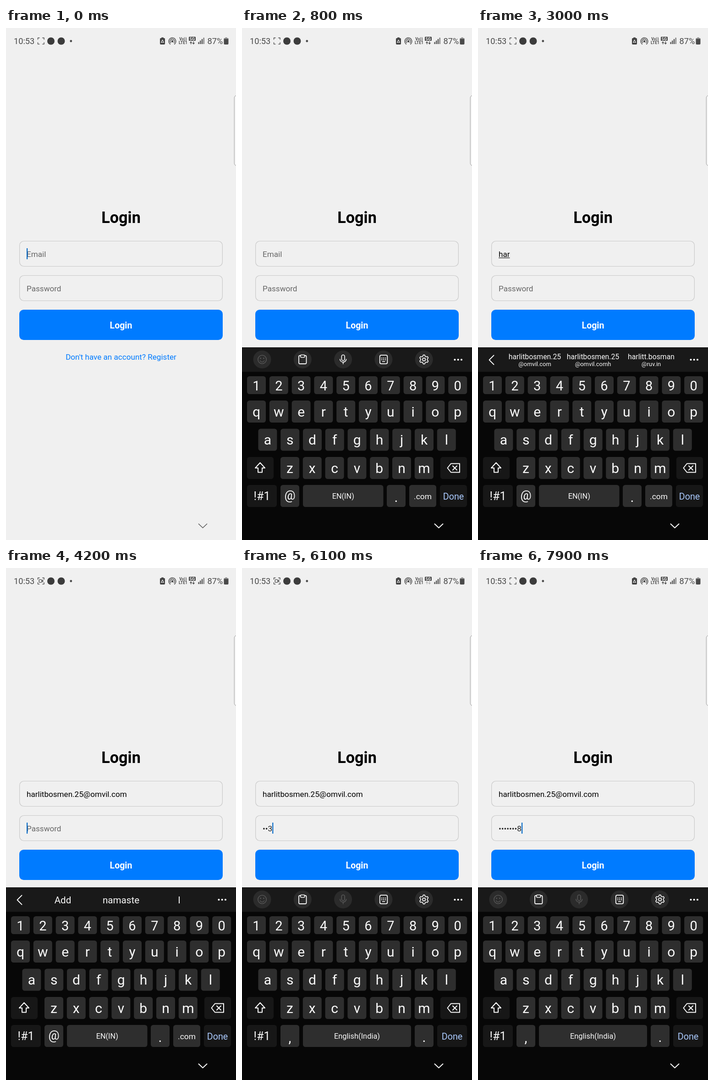
Animation, 502 px wide and 1116 px high, one loop 8000 ms. Source, as an HTML page with a canvas:

```html
<!DOCTYPE html>
<html lang="en">
<head>
<meta charset="utf-8">
<title>Login form typing</title>
<style>
html, body { margin: 0; width: 100%; height: 100%; overflow: hidden; background: #f0f0f0; }
canvas { display: block; width: 100vw; height: 100vh; }
</style>
</head>
<body>
<canvas id="stage" width="502" height="1116"></canvas>
<script>
const ctx = document.getElementById('stage').getContext('2d');
const LOOP = 8000, STEP = 100, PITCH = 48.8;
const BLUE = '#007bff', KEY = '#2e2e2e', FN = '#171717', INK = '#4a4a4a', WHITE = '#fafafa', DIM = '#565656';
const USER = 'harlitbosmen.25', HOST = '@omvil.com', EMAIL = USER + HOST;
const ROWS = [
  { keys: '1234567890', x: 11, y: 759, h: 39, base: 790, size: 29 },
  { keys: 'qwertyuiop', x: 11, y: 812, h: 48, base: 847, size: 30 },
  { keys: 'asdfghjkl', x: 35.4, y: 873.5, h: 48, base: 908, size: 30 },
  { keys: 'zxcvbnm', x: 84, y: 935, h: 48, base: 969.5, size: 30 }
];
// A key shows its bubble for one step, then its character is entered.
const PRESSES = [
  ['h', 1000], ['a', 1200], ['r', 1400],
  ['1', 5000], ['2', 5300], ['3', 5800], ['4', 6200],
  ['5', 6600], ['6', 7100], ['7', 7500], ['8', 7800]
];
const PICK = 3500, FOCUS = 4100, PASS_KEYS = 4300;

function text(s, x, y, size, color, align = 'left', weight = 400) {
  ctx.font = `${weight} ${size}px Roboto, sans-serif`;
  ctx.textAlign = align;
  ctx.fillStyle = color;
  ctx.fillText(s, x, y);
}

function box(x, y, w, h, r, fill, stroke, lw = 1.2) {
  ctx.beginPath();
  ctx.roundRect(x, y, w, h, r);
  if (fill) { ctx.fillStyle = fill; ctx.fill(); }
  if (stroke) { ctx.strokeStyle = stroke; ctx.lineWidth = lw; ctx.stroke(); }
}

function disc(x, y, r, fill) {
  ctx.beginPath();
  ctx.arc(x, y, r, 0, 7);
  ctx.fillStyle = fill;
  ctx.fill();
}

function arc(x, y, r, from, to, color, lw) {
  ctx.beginPath();
  ctx.arc(x, y, r, from, to);
  ctx.strokeStyle = color;
  ctx.lineWidth = lw;
  ctx.stroke();
}

function line(points, color, lw, close) {
  ctx.beginPath();
  points.forEach(([x, y]) => ctx.lineTo(x, y));
  if (close) ctx.closePath();
  ctx.strokeStyle = color;
  ctx.lineWidth = lw;
  ctx.lineJoin = ctx.lineCap = 'round';
  ctx.stroke();
}

function drawStatus(t) {
  text('10:53', 17, 35, 18.2, INK);
  for (const sx of [-1, 1]) for (const sy of [-1, 1]) {
    const at = (a, b) => [76.3 + sx * a, 28.3 + sy * b];
    line([at(6.8, 3.4), at(6.8, 6.8), at(3.4, 6.8)], INK, 1.3);
  }
  const blink = Math.floor((t - 198) / 491);
  if (blink >= 0 && blink % 2 === 0) {
    box(72.2, 25.3, 5.8, 6, 1.2, null, INK, 1.3);
    line([[78.2, 28], [80.6, 26], [80.6, 30.6], [78.2, 28.6]], INK, 1.1);
  }
  disc(98, 28.5, 8, '#3c3c3c');
  disc(120.5, 28.5, 8, '#3c3c3c');
  disc(141.8, 28.5, 2.4, INK);

  box(339, 20.5, 5, 3, 1, '#444');
  box(336, 22, 11, 14, 2, '#444');
  line([[341.5, 26], [344.3, 31.5], [338.7, 31.5]], '#eee', 1.2, true);

  disc(363, 29, 2.4, INK);
  arc(363, 29, 4.9, 2.4, 7.02, INK, 1.5);
  arc(363, 29, 7.8, 2.2, 7.22, INK, 1.5);

  text('Vo))', 386.5, 27, 8.6, INK, 'center', 700);
  text('LTE1', 386.5, 35, 8.6, INK, 'center', 700);
  box(399, 19, 15, 9, 1.5, '#444');
  text('5G', 406.5, 26.8, 9, '#f4f4f4', 'center', 700);
  const data = t >= 5200 && t < 7000 ? '#b5b5b5' : INK;
  line([[403.7, 35], [403.7, 30.3], [401.8, 32.3]], data, 1.3);
  line([[403.7, 30.3], [405.4, 32.3]], data, 1.3);
  line([[409.3, 30], [409.3, 34.8], [407.5, 32.8]], data, 1.3);
  line([[409.3, 34.8], [411.2, 32.8]], data, 1.3);

  for (let i = 0; i < 4; i++) {
    const h = 4.5 + i * 3.2;
    box(419.5 + i * 3.7, 35 - h, 2.2, h, 0.6, i < 3 ? INK : '#777');
  }
  text('87%', 439.5, 35, 18.2, INK);
  box(478.5, 20.5, 4, 2, 0.5, '#8a8a8a');
  box(475.5, 22, 10, 14, 2, INK);
  box(476, 22, 9, 2, 1, '#8a8a8a');
}

// Blinking caret: solid for half a second after each edit.
function drawCaret(x, y, t, since) {
  if (Math.floor((t - since) / 500) % 2 === 0) {
    ctx.fillStyle = '#0a6cc8';
    ctx.fillRect(x, y, 2.2, 24);
  }
}

function drawForm(t) {
  const done = PRESSES.filter(([, at]) => t >= at + STEP);
  const typed = done.map(([k]) => k).join('');
  const email = t >= PICK ? EMAIL : typed;
  const digits = typed.slice(3);
  const last = done.length ? done[done.length - 1][1] + STEP : 0;

  box(498.3, 147, 12, 153, 5, '#f6f6f6', '#9c9c9c', 1);
  text('Login', 251, 425, 34.2, '#000', 'center', 700);
  for (const y of [464.5, 539.5]) box(29.6, y, 442.8, 55, 9.5, null, '#c9c9c9');
  box(29, 614, 444, 66, 9.5, BLUE);
  text('Login', 251, 655, 19.5, '#fff', 'center', 700);
  text("Don't have an account? Register", 251, 722.5, 17.1, BLUE, 'center');

  text(email || 'Email', 45, 498.5, 17.1, email ? '#000' : '#666');
  const emailWidth = email ? ctx.measureText(email).width : 0;
  if (email && t < PICK) {
    ctx.fillStyle = '#000';
    ctx.fillRect(45, 500.5, emailWidth, 1.1);
  }
  if (t < FOCUS) {
    drawCaret(45 + emailWidth, 480, t, t >= PICK ? PICK : last);
    text('Password', 45, 573.5, 17.1, '#666');
    return;
  }
  const n = digits.length;
  const shown = n && t - last < 1500 ? '•'.repeat(n - 1) + digits[n - 1] : '•'.repeat(n);
  text(shown || 'Password', 45, 573.5, 17.1, n ? '#222' : '#666');
  drawCaret(45 + (n ? ctx.measureText(shown).width : 0), 555, t, Math.max(FOCUS, last));
}

function drawMore() {
  for (const x of [464.5, 471.7, 479]) disc(x, 723, 2.1, WHITE);
}

function drawTools(pass) {
  const y = 722.5;
  for (let i = 0; i < 5; i++) disc(44 + i * 88.3, y, 19.5, '#2b2b2b');

  arc(44, y, 9.2, 0, 7, DIM, 1.6);
  arc(44, y + 0.5, 5, 0.4, 2.74, DIM, 1.5);
  disc(40.6, y - 2.5, 1.4, DIM);
  disc(47.4, y - 2.5, 1.4, DIM);

  box(124, y - 8.5, 16.5, 18, 2.5, null, WHITE, 1.8);
  box(128, y - 10, 8.5, 5.5, 1, '#2b2b2b', WHITE, 1.6);

  const mic = pass ? DIM : WHITE;
  box(217.3, y - 10, 6.8, 12.5, 3.4, null, mic, 1.7);
  arc(220.7, y - 1.2, 7, 0.1, 3.04, mic, 1.7);
  line([[220.7, y + 6], [220.7, y + 9.5]], mic, 1.7);

  box(300.8, y - 9.3, 16.5, 18.6, 3, null, WHITE, 1.8);
  for (let i = 0; i < 6; i++) {
    ctx.fillStyle = WHITE;
    ctx.fillRect(304.2 + (i % 3) * 3.9, y - 4 + Math.floor(i / 3) * 3.6, 2, 2);
  }
  ctx.fillRect(306, y + 3.8, 6.2, 1.6);

  const gear = [];
  for (let a = 0; a < 6.28; a += 0.1) {
    const r = 8.6 + 1.3 * Math.tanh(2.5 * Math.cos(6 * a));
    gear.push([397.2 + r * Math.sin(a), y - r * Math.cos(a)]);
  }
  line(gear, WHITE, 1.7, true);
  arc(397.2, y, 3.2, 0, 7, WHITE, 1.7);
}

function drawSuggestions(t) {
  line([[34.5, 713.5], [24.5, 723.5], [34.5, 733.5]], WHITE, 1.8);
  if (t >= PICK + STEP) {
    ['Add', 'namaste', 'I'].forEach((s, i) => text(s, 124 + i * 127, 731, 20.6, WHITE, 'center'));
    return;
  }
  const list = [[USER, HOST], [USER, HOST + 'h'], ['harlitt.bosman', '@ruv.in']];
  list.forEach(([name, host], i) => {
    text(name, 124 + i * 127, 722, 15.8, WHITE, 'center');
    text(host, 124 + i * 127, 737, 12.9, WHITE, 'center');
  });
}

function drawBottomRow(pass) {
  const key = (x, w, label, size, base, fill = KEY, color = WHITE) => {
    box(x, 996, w, 48, 5.5, fill);
    text(label, x + w / 2, base, size, color, 'center');
  };
  key(11, 65, '!#1', 25, 1029, FN);
  if (pass) {
    key(84, 41, ',', 30, 1034);
    key(133, 236, 'English(India)', 16.4, 1026);
    key(377, 41, '.', 30, 1033);
    key(426, 65, 'Done', 19.8, 1028, FN, '#a9c8fb');
  } else {
    key(84, 41, '@', 27, 1028);
    key(133, 175.5, 'EN(IN)', 16.3, 1026);
    key(316, 41, '.', 30, 1033);
    key(365, 59, '.com', 17.4, 1027);
    key(432, 59, 'Done', 19.8, 1028, FN, '#a9c8fb');
  }
}

function drawKeyboard(t) {
  const pass = t >= PASS_KEYS;
  const press = PRESSES.find(([, at]) => t >= at && t < at + STEP);
  let bubble = null;

  ctx.fillStyle = '#070707';
  ctx.fillRect(0, 696, 502, 900);
  ctx.fillStyle = '#191919';
  ctx.fillRect(0, 696, 502, 53.5);
  if (t < 1100 || pass) drawTools(pass);
  else drawSuggestions(t);
  drawMore();

  for (const row of ROWS) [...row.keys].forEach((k, i) => {
    const x = row.x + i * PITCH, hit = press && press[0] === k;
    box(x, row.y, 41, row.h, 5.5, hit ? '#474747' : KEY);
    text(k, x + 20.5, row.base, row.size, WHITE, 'center');
    if (hit) bubble = { k, x: Math.max(10, x - 17), y: row.y - 105.5 };
  });

  box(11, 935, 58, 48, 5.5, FN);
  line([[39.5, 947.5], [50, 959], [44, 959], [44, 968.5], [35, 968.5], [35, 959], [29, 959]], WHITE, 2, true);
  box(433, 935, 58, 48, 5.5, FN);
  line([[448.5, 959], [456, 949.5], [475, 949.5], [475, 968.5], [456, 968.5]], WHITE, 2, true);
  line([[460, 954.5], [469, 963.5]], WHITE, 2);
  line([[469, 954.5], [460, 963.5]], WHITE, 2);
  drawBottomRow(pass);

  if (bubble) {
    box(bubble.x, bubble.y, 75.5, 97, 10, '#2b2b2b');
    text(bubble.k, bubble.x + 37.75, bubble.y + 64.5, 42, WHITE, 'center');
  }
}

function drawHideArrow(t) {
  const points = [[420.5, 1081], [429.5, 1089.5], [438.5, 1081]];
  if (t < 100) line(points, '#606060', 1.7);
  else if (t < 300) {
    line(points, '#777', 3.6);
    line(points, '#070707', 1.6);
  } else line(points, WHITE, 2);
}

function draw(t) {
  ctx.fillStyle = '#f0f0f0';
  ctx.fillRect(0, 0, 502, 1116);
  drawStatus(t);
  drawForm(t);
  const drop = t < 400 ? 420 * Math.exp(-t / 50) : 0;
  ctx.save();
  ctx.translate(0, drop);
  drawKeyboard(t);
  ctx.restore();
  drawHideArrow(t);
}

const start = performance.now();
function tick() {
  const t = (performance.now() - start) % LOOP;
  draw(Math.floor(t / STEP) * STEP);
  requestAnimationFrame(tick);
}
tick();
</script>
</body>
</html>
```
